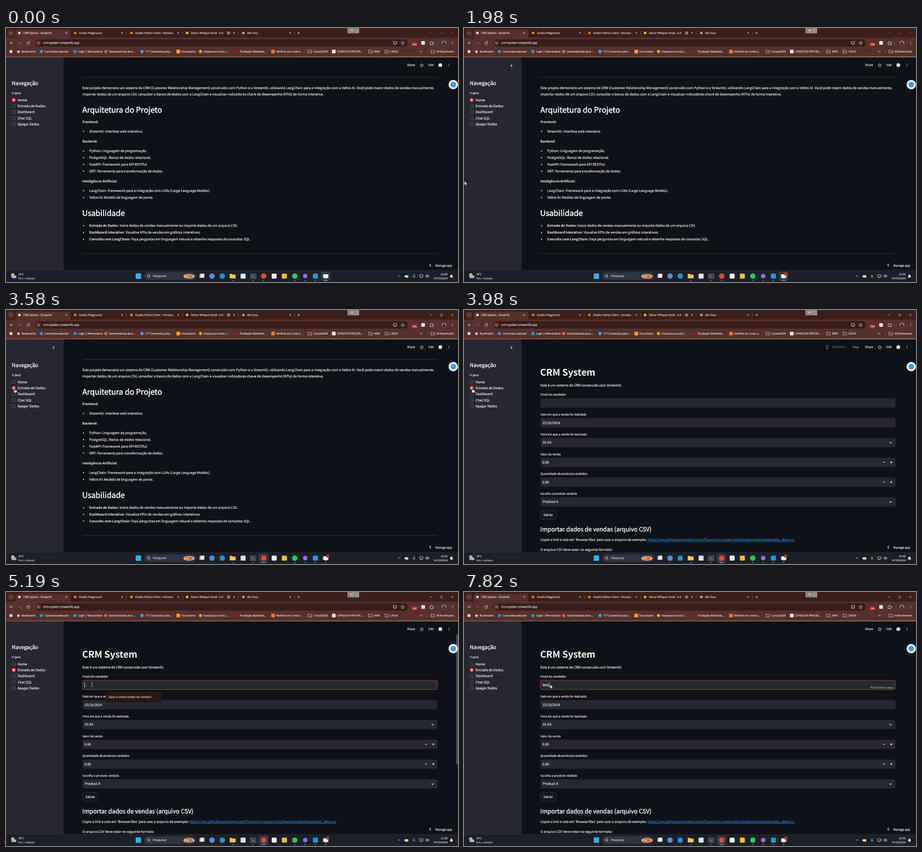
An HTML page with a canvas for the animation above (8000 ms loop, 997 by 561 pixels).

```html
<!DOCTYPE html>
<html lang="pt">
<head>
<meta charset="utf-8">
<title>CRM System</title>
<style>
html, body { margin: 0; height: 100%; overflow: hidden; background: #0e1117; }
canvas { display: block; }
</style>
</head>
<body>
<canvas id="stage" width="997" height="561"></canvas>
<script>
const ctx = document.getElementById('stage').getContext('2d');
const LOOP = 8000, TICK = 200;
const UI_FONT = '"Open Sans", sans-serif';
const APP_FONT = '"Noto Sans CJK JP", "Noto Sans CJK SC", "Noto Sans CJK", sans-serif';
const WHITE = '#fafafa', PALE = '#f3e9e7', PAGE = '#0e1117', PANEL = '#262730', RED = '#ff4b4b';
const BODY = 7.43, SMALL = 6.5;

// Text is placed by its left edge and the middle of its capitals; an outline thickens light faces.
function text(str, x, y, size, color, family, weight = 400, outline = weight === 400 ? 0.17 : 0) {
  const baseline = y + size * 0.36;
  ctx.font = `${weight} ${size}px ${family}`;
  ctx.fillStyle = ctx.strokeStyle = color;
  ctx.fillText(str, x, baseline);
  if (outline) {
    ctx.lineWidth = outline;
    ctx.strokeText(str, x, baseline);
  }
  return x + ctx.measureText(str).width;
}
const ui = (str, x, y, size = 5.77, color = PALE, weight) => text(str, x, y, size, color, UI_FONT, weight);
const app = (str, x, y, size = BODY, weight, color = WHITE) => text(str, x, y, size, color, APP_FONT, weight);
const heading = (str, x, y, size) => text(str, x, y, size, WHITE, APP_FONT, 400, size * 0.032);

function box(x, y, w, h, fill, radius = 0, border) {
  ctx.beginPath();
  ctx.roundRect(x, y, w, h, radius);
  if (fill) { ctx.fillStyle = fill; ctx.fill(); }
  if (border) { ctx.strokeStyle = border; ctx.lineWidth = 0.65; ctx.stroke(); }
}
function disc(x, y, r, fill, border, width = 0.7) {
  ctx.beginPath();
  ctx.arc(x, y, r, 0, Math.PI * 2);
  if (fill) { ctx.fillStyle = fill; ctx.fill(); }
  if (border) { ctx.strokeStyle = border; ctx.lineWidth = width; ctx.stroke(); }
}
const square = (x, y, size, fill, radius = 1) => box(x - size / 2, y - size / 2, size, size, fill, radius);

function icon(path, x, y, stroke, width = 0.9, fill) {
  const shape = new Path2D(path);
  ctx.save();
  ctx.translate(x, y);
  if (fill) { ctx.fillStyle = fill; ctx.fill(shape); }
  if (stroke) { ctx.strokeStyle = stroke; ctx.lineWidth = width; ctx.stroke(shape); }
  ctx.restore();
}
const SHAPE = {
  close: 'M-2-2L2 2M2-2L-2 2',
  down: 'M-2.2-1L0 1.2L2.2-1',
  up: 'M-2.2 1L0-1.2L2.2 1',
  left: 'M1.3-2.8L-1.5 0L1.3 2.8',
  plus: 'M-2.4 0H2.4M0-2.4V2.4',
  minus: 'M-2.4 0H2.4',
  back: 'M3 0H-3M0-3L-3 0L0 3',
  forward: 'M-3 0H3M0-3L3 0L0 3',
  reload: 'M2.4-1.6A3 3 0 1 0 3 .6M3-3.2V-1H.8',
  star: 'M0-3.6L1.1-1.2L3.7-.9L1.8.9L2.3 3.5L0 2.2L-2.3 3.5L-1.8.9L-3.7-.9L-1.1-1.2Z',
  folder: 'M-4-3H-1L0-2H4V3H-4Z',
  lens: 'M1.4 1.4L3.4 3.4M2-.6A2.6 2.6 0 1 1 -3.2-.6A2.6 2.6 0 1 1 2-.6',
  screen: 'M-3.5-3H3.5V2H-3.5ZM-1.5 3.5H1.5',
  puzzle: 'M-3-2H-1.2A1.2 1.2 0 1 1 1.2-2H3V.2A1.2 1.2 0 1 1 3 2V3.6H-3Z',
  mic: 'M0-3.6A1.3 1.3 0 0 1 1.3-2.3V0A1.3 1.3 0 0 1-1.3 0V-2.3A1.3 1.3 0 0 1 0-3.6M-2.5 0A2.5 2.5 0 0 0 2.5 0M0 2.5V4',
  speaker: 'M-3.5-1.2H-1.8L.2-3V3L-1.8 1.2H-3.5ZM1.5-1.8Q2.6 0 1.5 1.8M2.8-2.8Q4.6 0 2.8 2.8',
  bell: 'M-3 2.4Q-2 1-2-1A2 2 0 0 1 2-1Q2 1 3 2.4ZM-.8 3.4H.8',
  runner: 'M0-4.4V-3M-4-2H4M0-2V1L-1.8 4.8M0 1L1.8 4.8',
  arrow: 'M0 0V9.4L2.1 7.4L3.6 10.8L5.1 10.1L3.6 6.9H6.5Z',
  hand: 'M0 0Q1.3-.6 1.6.6V4L5.8 4.9Q6.5 5.2 6.2 6.6L5.4 10.3H.9L-2 6.5Q-1.6 5.2 0 6.3Z',
  beam: 'M-1.8-4H1.8M0-4V4M-1.8 4H1.8'
};
function kebab(x, y, color) {
  for (const dy of [-2.6, 0, 2.6]) disc(x, y + dy, 0.75, color);
}

function drawTabs(active) {
  box(0, 0, 997, 22, '#3c1e1a');
  box(4, 4, 14, 14, '#55302c', 4);
  icon(SHAPE.down, 11, 11, PALE);
  box(21, 3.5, 121, 22, '#55302c', 5);
  const tabs = [
    ['CRM System - Streamlit', 38, '#ece7e6'],
    ['Gradio Playground', 161, '#f58a1f'],
    ['Gradio Python Client - Introduc', 285, '#f58a1f'],
    ['Zelnor Whisper Small - a H', 408, '#f5c330'],
    ['dbt Docs', 532, '#b9b2b1']
  ];
  tabs.forEach(([title, x, color], i) => {
    disc(x - 8.5, 11, 2.8, color);
    ctx.save();
    ctx.beginPath();
    ctx.rect(x, 0, i === 3 ? 76 : 85, 22);
    ctx.clip();
    ui(title, x, 11, 5.8);
    ctx.restore();
    icon(SHAPE.close, x + 95, 11, PALE, 0.8);
    if (i) box(x + 104, 7, 0.7, 8, '#80615d');
  });
  disc(491, 11, 3.2, null, PALE);
  disc(491, 11, 1.4, PALE);
  icon(SHAPE.plus, 645.5, 11, PALE);

  box(753, 0, 26, 12, '#8b8382');
  ui('PT', 759.5, 6, 6, '#f4f0ef');
  icon('M-2-1V-3H0M2-3H3V-1M-2 1V3H0M2 3H3V1', 774, 6, '#f4f0ef', 0.7);

  const control = active ? '#f5eeed' : '#82655f';
  icon(SHAPE.minus, 937, 11, control, 0.8);
  box(958.8, 9.2, 4, 4, null, 0.5, control);
  icon(SHAPE.close, 984.5, 11, control, 0.8);
}

function drawToolbar() {
  box(0, 21, 997, 43, '#55302c');
  icon(SHAPE.back, 12, 33, PALE);
  icon(SHAPE.forward, 30, 33, '#8d6f6b');
  icon(SHAPE.reload, 49, 33, PALE);
  box(65, 25, 822, 16, '#371d1a', 8);
  disc(71.5, 33, 5.5, '#55302c');
  icon('M-2.8-1.5H.5M2-1.5H2.8M-2.8 1.5H-2M-.5 1.5H2.8', 71.5, 33, PALE);
  ui('crm-system.streamlit.app', 82, 33, 6.73, '#f4eceb');
  icon(SHAPE.screen, 858, 33, PALE);
  icon(SHAPE.star, 875, 33, PALE, 0.8);
  box(895.5, 32, 11, 8, '#d32020', 1);
  ui('17m', 896, 36.3, 4.7, '#fff', 700);
  square(920, 33, 8, '#f2efee', 1.5);
  icon(SHAPE.puzzle, 938.5, 33, PALE);
  box(952, 29, 0.7, 8, '#80615d');
  disc(966, 33, 5.3, '#8d7f7a');
  disc(966, 32, 2, '#2d2423');
  box(962.5, 33.5, 7, 4, '#2d2423', 2);
  kebab(985, 33, PALE);
}

function drawBookmarks() {
  const y = 52;
  disc(11, y, 3.3, '#e9e4e3');
  icon(SHAPE.star, 27.5, y, null, 0, PALE);
  ui('Bookmarks', 34.5, y);
  const links = [
    ['Comandos executar', 85, '#3d8fd1'], ['Login | Marvendora', 159, '#1e9bdc'],
    ['Gerenciadores de e-...', 227, '#d9693c'], ['117 Comandos para...', 307, '#4aa3dd'],
    ['Docunestra', 387, '#f3a12e', 1], ['Acesse sua conta |...', 436, '#d8ab3e'],
    ['Fundação Malverde...', 516, '#9b1c1c'], ['Verificar se o imei e...', 596, '#f4772b', 1],
    ['CONSULTA PROCES...', 730, '#ecebea', 1]
  ];
  for (const [label, x, color, boxy] of links) {
    if (boxy) square(x - 7, y, 8, color); else disc(x - 7, y, 3.4, color);
    ui(label, x, y);
  }
  for (const [label, x] of [['Cursos2020', 678], ['MAR', 812], ['LINUX', 848], ['All Bookmarks', 949.5]]) {
    icon(SHAPE.folder, x - 8, y, PALE, 0.8);
    ui(label, x, y);
  }
  icon('M-2.6-2L-.6 0L-2.6 2M.4-2L2.4 0L.4 2', 916, y, PALE, 0.8);
  box(929, 48, 0.7, 8, '#80615d');
}

function drawSidebar(selected, hovered) {
  box(0, 64, 127, 471, PANEL);
  if (hovered) icon(SHAPE.left, 105, 83, WHITE, 1.1);
  heading('Navegação', 12.8, 121.5, 11.35);
  app('Ir para', 13, 144, SMALL);
  ['Home', 'Entrada de Dados', 'Dashboard', 'Chat SQL', 'Apagar Dados'].forEach((label, i) => {
    const y = 159 + i * 13.3;
    if (i === selected) {
      disc(17, y, 4.2, RED);
      disc(17, y, 1.6, '#fff');
    } else {
      disc(17, y, 3.9, PANEL, '#7b7c84');
    }
    app(label, 25.5, y);
  });
}

function drawPageHeader(running) {
  if (running) {
    icon(SHAPE.runner, 801, 82, '#787a80', 1.1);
    app('RUNNING...', 812, 82, SMALL, 400, '#63656c');
    app('Stop', 857, 82, SMALL, 400, '#9a9ca1');
  }
  app('Share', 884.5, 82, SMALL);
  icon(SHAPE.star, 917, 82, WHITE, 0.8);
  app('Edit', 931.5, 82, SMALL);
  disc(958, 82, 4.1, WHITE);
  kebab(977, 82, WHITE);
}

function bullet(y, label, bold = '') {
  disc(171, y + 0.3, 1.2, WHITE);
  const x = bold ? app(bold + ' ', 183.5, y, 7.3, 700) : 183.5;
  app(label, x, y);
}

function drawHome() {
  box(169, 108.6, 783, 0.8, '#3a3d43');
  app('Este projeto demonstra um sistema de CRM (Customer Relationship Management) construído com Python e o Streamlit, utilizando LangChain para a integração com o Veltro AI. Você pode inserir dados de vendas manualmente,', 168.5, 132.5);
  app('importar dados de um arquivo CSV, consultar o banco de dados com a LangChain e visualizar indicadores chave de desempenho (KPIs) de forma interativa.', 168.5, 146);
  heading('Arquitetura do Projeto', 168.5, 181, 16.95);
  app('Frontend:', 168.5, 207, 7.3, 700);
  bullet(228, 'Streamlit: Interface web interativa.');
  app('Backend:', 168.5, 250, 7.3, 700);
  bullet(271.5, 'Python: Linguagem de programação.');
  bullet(286, 'PostgreSQL: Banco de dados relacional.');
  bullet(301, 'FastAPI: Framework para API RESTful.');
  bullet(316, 'DBT: Ferramenta para transformação de dados.');
  app('Inteligência Artificial:', 168.5, 338, 7.3, 700);
  bullet(359, 'LangChain: Framework para a integração com LLMs (Large Language Models).');
  bullet(374, 'Veltro AI: Modelo de linguagem de ponta.');
  heading('Usabilidade', 168, 409, 16.95);
  bullet(436.5, 'Insira dados de vendas manualmente ou importe dados de um arquivo CSV.', 'Entrada de Dados:');
  bullet(451.5, 'Visualize KPIs de vendas em gráficos interativos.', 'Dashboard Interativo:');
  bullet(466, 'Faça perguntas em linguagem natural e obtenha respostas de consultas SQL.', 'Consulta com LangChain:');
  box(169, 497.6, 783, 0.8, '#3a3d43');
}

function drawForm({ focused, typed, caret, hint }) {
  app('CRM System', 168, 137.5, 20.2, 700);
  app('Este é um sistema de CRM construído com Streamlit.', 168.5, 166);
  const fields = [
    ['Email do vendedor', ''], ['Data em que a venda foi realizada', '15/10/2024'],
    ['Hora em que a venda foi realizada', '01:43', 'select'], ['Valor da venda', '0.00', 'number'],
    ['Quantidade de produtos vendidos', '0.00', 'number'], ['Escolha o produto vendido', 'Product A', 'select']
  ];
  fields.forEach(([label, value, kind], i) => {
    const y = 205.2 + i * 43.72;
    app(label, 168.5, y - 18.2, SMALL);
    box(168.7, y - 10.2, 783, 20.5, PANEL, 4, i === 0 && focused ? RED : null);
    app(value, kind === 'select' ? 174 : 173, y);
    if (kind === 'select') icon(SHAPE.down, 941, y, WHITE, 1.2);
    if (kind === 'number') {
      icon(SHAPE.minus, 926.5, y, WHITE, 1.1);
      icon(SHAPE.plus, 942.5, y, WHITE, 1.1);
    }
  });
  const end = app(typed, 173, 205.6);
  if (caret) box(end, 200, 0.9, 11, WHITE);
  if (typed) app('Press Enter to apply', 896.5, 211, 5.57, 400, '#a3a4a9');
  box(168.9, 442.6, 34, 20, '#131720', 4, '#41444c');
  app('Salvar', 175, 452.5);
  heading('Importar dados de vendas (arquivo CSV)', 168.3, 484, 13.15);
  app("Copie o link e cole em 'Browse files' para usar o arquivo de exemplo:", 168.5, 507.5);
  const linkEnd = app('https://raw.githubusercontent.com/Tavro/crm-system/refs/heads/master/data/sales_data.csv', 405, 507.5, BODY, 400, '#2a8ae6');
  box(405, 511.3, linkEnd - 405, 0.6, '#2a8ae6');
  app('O arquivo CSV deve estar no seguinte formato:', 168.5, 529);
  if (hint) {
    icon('M-4 2L0-2L4 2Z', 231, 219, null, 0, '#281917');
    box(220, 220.5, 124, 23.5, '#281917', 4);
    ui('Qual o ticket médio de vendas?', 226.5, 232, 6.3, PALE, 600);
  }
}

function drawTaskbar(active, recording) {
  const y = 548;
  box(0, 535, 997, 26, '#1c1f28');
  box(0, 535, 997, 0.6, '#30333c');
  disc(15, 545.5, 3.8, '#f5b32c');
  box(12, 546.5, 11, 6, '#8dbbe8', 3);
  ui('16°C', 26.5, 544);
  ui('Parc. nublado', 26.5, 552.5, 5.77, '#c6c8ce');
  square(292, y, 12, '#2fb0ee');
  box(305, 540, 114, 16, '#30343e', 8, '#3f434d');
  icon(SHAPE.lens, 315, y, WHITE);
  ui('Pesquisar', 324, y, 6.65, '#d6d8dd');
  ctx.save();
  ctx.translate(403.5, 548.5);
  ctx.scale(1, 0.42);
  disc(0, 0, 12, '#e9dccb');
  disc(0, 0, 9.5, '#d95f35');
  disc(-3, 0, 4, '#f0b467');
  ctx.restore();

  const focusX = active ? 568 : 705;
  box(focusX - 10.5, 537.5, 21, 21, '#343841', 3);
  box(426, 544, 9, 8, '#7e828b', 1);
  box(428.5, 542.5, 9, 9, '#e8e9eb', 1);
  disc(454.5, y, 6, '#578fd8');
  disc(477, y, 6, '#1f93d2');
  icon('M-6.5-5H-2L-.5-3.5H6.5V5H-6.5Z', 500, y, null, 0, '#f6c84c');
  square(523, y, 11, '#d9e6f2', 1.5);
  box(539, 543, 12.5, 10.5, '#3b3e44', 1, '#85888f');
  icon('M-3-2L-1 0L-3 2M0 2H3', 545, y, WHITE, 0.8);
  disc(568.5, y, 6, '#e4493b');
  square(591.5, y, 11, '#f1f1f1', 2);
  square(614, y, 11, '#f0c51c', 1.5);
  disc(637, y, 6, '#1fce60');
  disc(660, y, 5, '#8d74dc');
  square(682.5, y, 11, '#2596dc', 2);
  box(699.5, 544, 11.5, 8, '#eceded', 1);
  box(703, 552, 5, 1.6, '#aeb1b7');
  if (recording) disc(709.5, 543.5, 3.3, '#b3261e', '#e34a3e');
  for (const x of [500, 545, 568, 637, 660, 682, 705]) {
    const wide = x === focusX;
    box(x - (wide ? 4.5 : 1.7), 557, wide ? 9 : 3.4, 1.4, wide ? '#62b8ea' : '#8b8e96', 0.7);
  }

  icon(SHAPE.up, 867, y, WHITE);
  box(879, 546, 8.5, 5, '#e3e5e9', 2.5);
  disc(885.5, 550, 2, '#f1b62d');
  icon(SHAPE.mic, 900, y, '#66aee5');
  icon(SHAPE.screen, 916, y, WHITE, 0.8);
  icon(SHAPE.speaker, 929, y, WHITE, 0.8);
  ctx.textAlign = 'right';
  ui('22:35', 974, 544, 5.9, '#f0f0f2');
  ui('14/10/2024', 974, 552.5, 5.9, '#f0f0f2');
  ctx.textAlign = 'left';
  icon(SHAPE.bell, 982.5, y, WHITE, 0.6, WHITE);
}

const CURSOR_PATH = [
  [1400, 984, 384], [1800, 250, 360], [2000, 1, 338], [2400, 30, 240], [2600, 30, 230],
  [3000, 20, 185], [3400, 18, 172.5], [4400, 18, 172.5], [4600, 30, 175], [5000, 190, 204], [8000, 190, 204]
];
function drawCursor(tick) {
  if (tick < CURSOR_PATH[0][0]) return;
  const next = Math.max(1, CURSOR_PATH.findIndex(([time]) => time >= tick));
  const [t0, x0, y0] = CURSOR_PATH[next - 1], [t1, x1, y1] = CURSOR_PATH[next];
  const part = (tick - t0) / (t1 - t0);
  const x = x0 + (x1 - x0) * part, y = y0 + (y1 - y0) * part;
  if (tick >= 5000 && tick < 7400) icon(SHAPE.beam, x, y, '#d5d6d9', 0.8);
  else icon(tick >= 3000 && tick < 4800 ? SHAPE.hand : SHAPE.arrow, x, y, '#111', 0.7, '#fff');
}

function draw(time) {
  const tick = Math.floor((time + 30) / TICK) * TICK;
  const between = (from, to) => tick >= from && tick < to;
  const active = between(400, 1000) || tick >= 3400;
  const typed = tick < 6800 ? '' : 'felix'.slice(0, (tick - 6800) / TICK + 1);

  ctx.textRendering = 'geometricPrecision';
  ctx.lineJoin = 'round';
  box(0, 0, 997, 561, PAGE);
  if (tick < 4000) drawHome();
  else drawForm({
    focused: tick >= 5200,
    typed,
    caret: between(5200, 5800) || tick >= 6200,
    hint: between(5200, 7000)
  });
  drawPageHeader(between(4000, 4200));
  if (between(4800, 7400)) box(993.5, 94, 3, 287, '#5b5e66', 1.5);
  disc(986.5, 125, 10.3, '#f6f8fb');
  disc(986.5, 125, 6.3, '#3f9ae6');
  icon(SHAPE.left, 936, 524, WHITE, 1.1);
  app('Manage app', 947, 524.5, SMALL);
  drawSidebar(tick < 3600 ? 0 : 1, between(2000, 4800));
  drawTabs(active);
  drawToolbar();
  drawBookmarks();
  const strip = ctx.createLinearGradient(0, 0, 997, 0);
  strip.addColorStop(0, '#d0665c');
  strip.addColorStop(1, '#e6d08e');
  box(0, 63.4, 997, 1.1, strip);
  drawTaskbar(active, tick >= 600);
  drawCursor(tick);
}

const start = performance.now();
function loop() {
  draw((performance.now() - start) % LOOP);
  requestAnimationFrame(loop);
}
loop();
</script>
</body>
</html>
```
